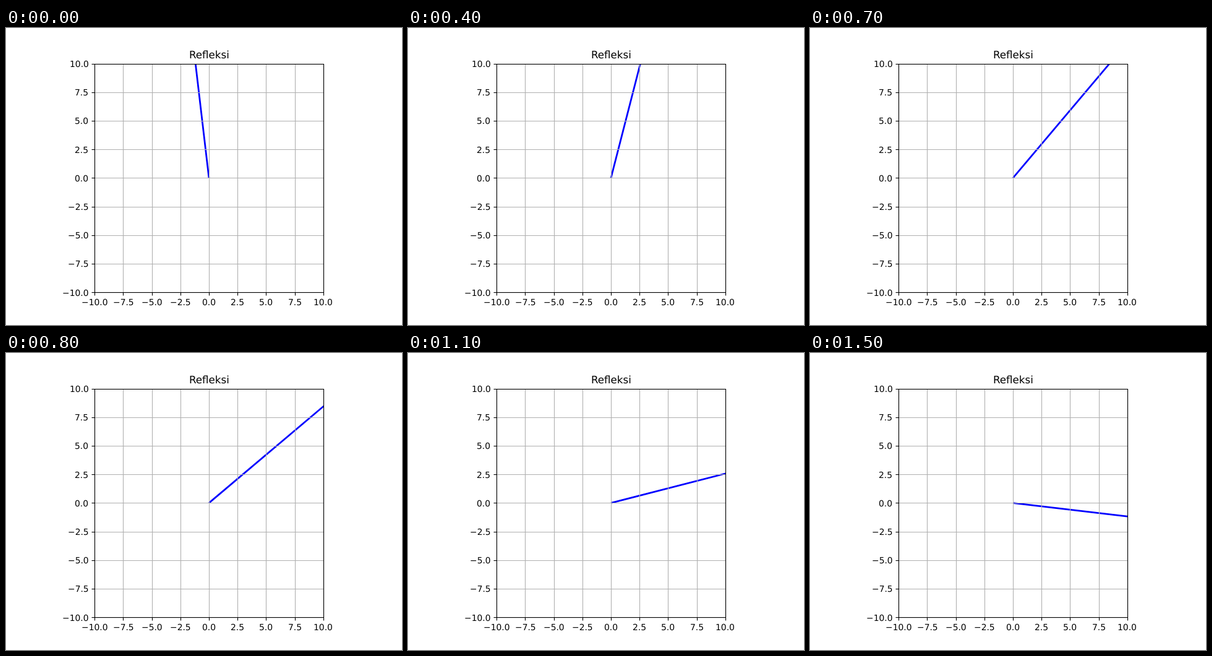
These frames come from a looping animation (640x480 px, 1550 ms). An HTML page with a canvas:

```html
<!DOCTYPE html>
<html lang="id">
<head>
<meta charset="utf-8">
<title>Refleksi</title>
<style>
  html, body { margin: 0; width: 100%; height: 100%; overflow: hidden; background: #fff; }
  canvas { display: block; }
</style>
</head>
<body>
<canvas id="stage" width="640" height="480"></canvas>
<script>
const ctx = document.getElementById('stage').getContext('2d');
const FONT = '"DejaVu Sans", sans-serif';
const LEFT = 143.2, TOP = 57.6, SIZE = 369.6;
const CX = LEFT + SIZE / 2, CY = TOP + SIZE / 2;
const STEP_MS = 50, STEPS = 31;
const HAIR = 0.8 * 100 / 72;

const snap = v => Math.floor(v + 0.5) + 0.5;
const ticks = Array.from({ length: 9 }, (_, i) => ({
  label: (i * 2.5 - 10).toFixed(1).replace('-', '\u2212'),
  x: LEFT + SIZE * i / 8,
  y: TOP + SIZE * (8 - i) / 8
}));
const x0 = snap(LEFT), x1 = snap(LEFT + SIZE);
const y0 = snap(TOP), y1 = snap(TOP + SIZE);

function line(xa, ya, xb, yb, color, width) {
  ctx.strokeStyle = color;
  ctx.lineWidth = width;
  ctx.beginPath();
  ctx.moveTo(xa, ya);
  ctx.lineTo(xb, yb);
  ctx.stroke();
}

// align: 0.5 centres the text on x, 1 ends it there
function text(str, x, baseline, px, align) {
  ctx.font = `${px}px ${FONT}`;
  ctx.textRendering = 'geometricPrecision';
  ctx.fillStyle = '#000';
  ctx.fillText(str, Math.round(x - ctx.measureText(str).width * align), baseline);
}

// The vector slides linearly from (-2, 17) to its mirror image (17, -2).
function drawVector(step) {
  const shift = 19 * step / (STEPS - 1);
  const dx = shift - 2, dy = 17 - shift;
  const reach = 600 / Math.hypot(dx, dy);
  ctx.save();
  ctx.beginPath();
  ctx.rect(143, 58, 370, 369);
  ctx.clip();
  line(CX, CY, CX + dx * reach, CY - dy * reach, '#00f', SIZE * 0.0075);
  ctx.restore();
}

function drawAxes() {
  for (const { x, y } of ticks) {
    line(snap(x), y0, snap(x), y1, '#b0b0b0', HAIR);
    line(x0, snap(y), x1, snap(y), '#b0b0b0', HAIR);
  }
  for (const { label, x, y } of ticks) {
    line(snap(x), y1, snap(x), y1 + 5, '#000', HAIR);
    line(x0, snap(y), x0 - 5, snap(y), '#000', HAIR);
    text(label, x, 448, 1000 / 72, 0.5);
    text(label, LEFT - 9.72, Math.round(y + 5.35), 1000 / 72, 1);
  }
  ctx.strokeStyle = '#000';
  ctx.lineWidth = HAIR;
  ctx.strokeRect(x0, y0, x1 - x0, y1 - y0);
  text('Refleksi', CX, 49, 1200 / 72, 0.5);
}

function draw(now) {
  ctx.fillStyle = '#fff';
  ctx.fillRect(0, 0, 640, 480);
  drawVector(Math.floor((now - start) / STEP_MS) % STEPS);
  drawAxes();
}

const start = performance.now();
function tick() {
  draw(performance.now());
  requestAnimationFrame(tick);
}
tick();
</script>
</body>
</html>
```
